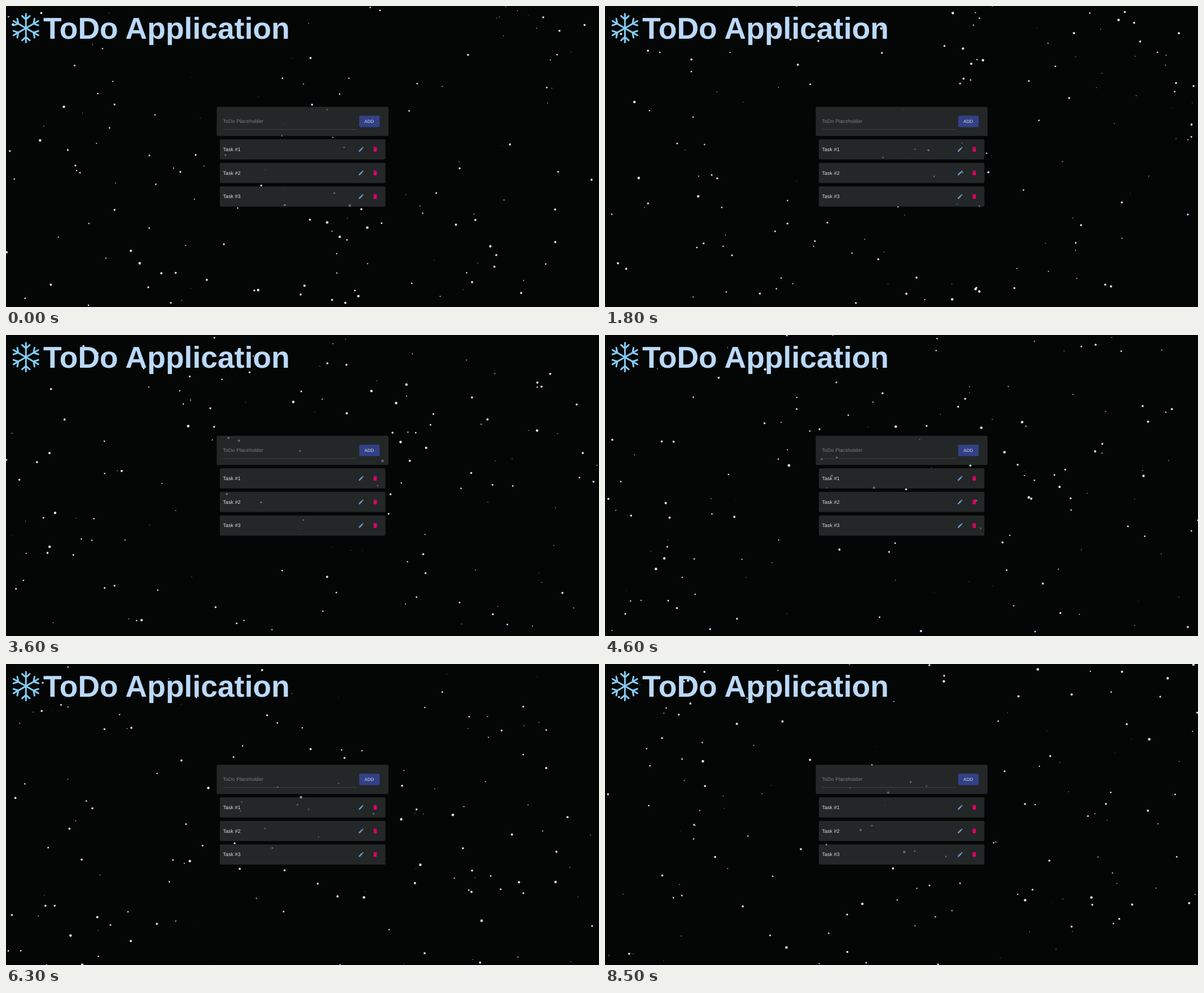
Animation, 1051 px wide and 533 px high, one loop 8.6 s. Source, as an HTML page with a canvas:

```html
<!DOCTYPE html>
<html lang="en">
<head>
<meta charset="utf-8">
<title>ToDo Application</title>
<style>
  html, body { margin: 0; width: 100%; height: 100%; overflow: hidden; background: #040606; }
  canvas, svg { position: absolute; left: 0; top: 0; width: 1051px; height: 533px; }
  text { font-family: "Liberation Sans", Arial, sans-serif; font-size: 8.95px; letter-spacing: .00938em; fill: #dedfdf; text-rendering: geometricPrecision; }
  .title { font-size: 53.5px; font-weight: bold; letter-spacing: 0; fill: #bbd9f8; }
  .hint { fill: #7c7e7e; }
  .add { font-size: 7.83px; letter-spacing: .02857em; }
  .card { fill: rgba(51, 53, 53, .7); }
  .edit { fill: #6c9bd2; }
  .delete { fill: #e3006a; }
</style>
</head>
<body>
<canvas id="snow" width="1051" height="533"></canvas>
<svg id="ui" viewBox="0 0 1051 533">
  <defs>
    <path id="arm" d="M0 0V-25.4M-6.8 -21.6L0 -15.6L6.8 -21.6"/>
    <g id="task">
      <rect class="card" x="379" width="293.5" height="35.8" rx="2.2"/>
      <path class="edit" transform="translate(623.9 12.2) scale(.466)"
        d="M3 17.25V21h3.75L17.81 9.94l-3.75-3.75L3 17.25zM20.71 7.04a1 1 0 0 0 0-1.41l-2.34-2.34a1 1 0 0 0-1.41 0l-1.83 1.83 3.75 3.75 1.83-1.83z"/>
      <path class="delete" transform="translate(648.8 12.2) scale(.466)"
        d="M6 19c0 1.1.9 2 2 2h8c1.1 0 2-.9 2-2V7H6v12zM19 4h-3.5l-1-1h-5l-1 1H5v2h14V4z"/>
    </g>
  </defs>

  <g id="flake" transform="translate(35.3 39.2)" fill="none" stroke="#85cdf6"
     stroke-width="3" stroke-linecap="round" stroke-linejoin="round"></g>
  <text class="title" x="66" y="58">ToDo Application</text>

  <rect class="card" x="373.5" y="178.4" width="304.5" height="51.8" rx="2.2"/>
  <text class="hint" x="384.4" y="207">ToDo Placeholder</text>
  <path d="M384.5 218.6H621.5" stroke="#525454" stroke-width=".6"/>
  <rect x="626" y="194.2" width="36.2" height="20.2" rx="2.2" fill="#324187"/>
  <text class="add" x="635.2" y="207">ADD</text>
  <g id="tasks"></g>
</svg>

<script>
const LOOP = 8600, STEP = 100, TICKS_PER_STEP = 6;
const WIDTH = 1051, HEIGHT = 533, SCALE = 0.56;
const FLAKES = 150, WIND_EASE = 0.01;

const byId = id => document.getElementById(id);

byId("flake").innerHTML = [0, 60, 120, 180, 240, 300]
  .map(angle => `<use href="#arm" transform="rotate(${angle})"/>`).join("");

byId("tasks").innerHTML = [1, 2, 3].map((n, i) =>
  `<g transform="translate(0 ${236 + i * 41.7})">
     <use href="#task"/><text x="384.4" y="20.9">Task #${n}</text>
   </g>`).join("");

// Seeded generator (mulberry32), so every loop shows the same snow.
let seed = 7;
function random(min, max) {
  seed = (seed + 0x6D2B79F5) | 0;
  let t = Math.imul(seed ^ (seed >>> 15), 1 | seed);
  t = (t + Math.imul(t ^ (t >>> 7), 61 | t)) ^ t;
  return min + (max - min) * ((t ^ (t >>> 14)) >>> 0) / 4294967296;
}

const flakes = Array.from({ length: FLAKES }, () => ({
  x: random(0, WIDTH),
  y: random(0, HEIGHT),
  radius: random(0.3, 2.3),
  speed: random(1, 3) * SCALE,
  wind: random(-0.5, 2) * SCALE,
  nextWind: random(-0.5, 2) * SCALE
}));

const wrap = (value, size, margin) => {
  const span = size + 2 * margin;
  return ((value + margin) % span + span) % span - margin;
};

const ctx = byId("snow").getContext("2d");

function drawSnow(ticks) {
  ctx.clearRect(0, 0, WIDTH, HEIGHT);
  ctx.fillStyle = "#dee4fd";
  // Total drift caused by the part of the wind that fades out.
  const fading = (1 - (1 - WIND_EASE) ** ticks) / WIND_EASE;
  for (const f of flakes) {
    const drift = f.nextWind * ticks + (f.wind - f.nextWind) * fading;
    const x = wrap(f.x + drift, WIDTH, f.radius);
    const y = wrap(f.y + f.speed * ticks, HEIGHT, f.radius);
    ctx.beginPath();
    ctx.arc(x, y, f.radius, 0, 2 * Math.PI);
    ctx.fill();
  }
}

function render() {
  const step = Math.floor(performance.now() % LOOP / STEP);
  drawSnow(Math.max(0, step - 1) * TICKS_PER_STEP);
  requestAnimationFrame(render);
}
render();
</script>
</body>
</html>
```
